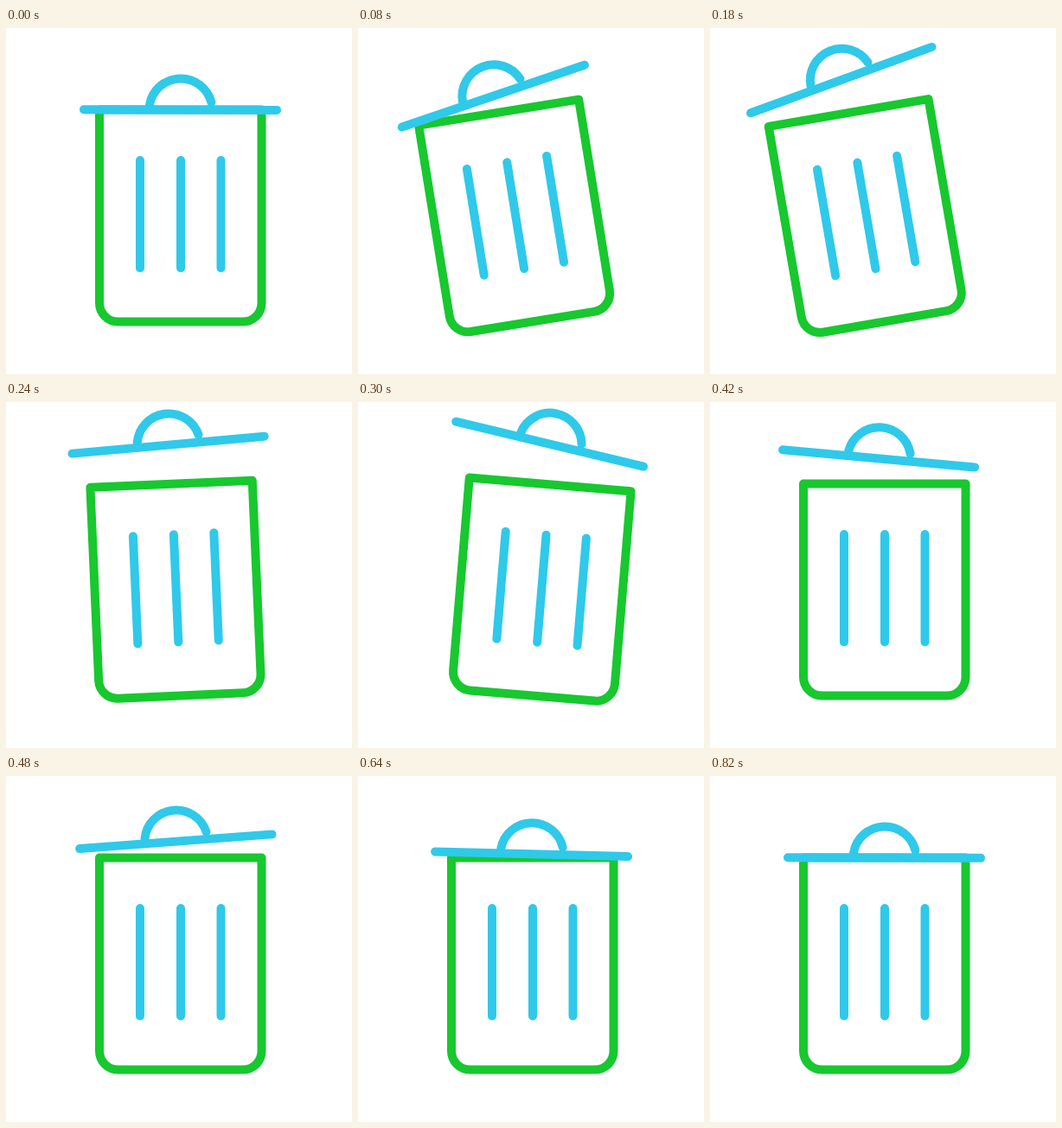
Recreate the animation shown at these times as an HTML page. Size 400x400 px, loop 0.84 s.

```html
<!DOCTYPE html>
<html lang="en">
<head>
<meta charset="utf-8">
<title>Trash can</title>
<style>
  html, body { margin: 0; width: 100%; height: 100%; overflow: hidden; background: #fff; }
  svg { display: block; width: 100vw; height: 100vh; }
  path { fill: none; stroke-width: 10; stroke-linecap: round; stroke-linejoin: round; }
  .green { stroke: #17c82e; }
  .blue { stroke: #2fc9ea; }
</style>
</head>
<body>
<svg viewBox="0 0 400 400">
  <g id="can">
    <path class="green" d="M108 94.5H295.5V318A21.5 21.5 0 0 1 274 339.5H129.5A21.5 21.5 0 0 1 108 318Z"/>
    <path class="blue" d="M155 153V277.5M202 153V277.5M248.5 153V277.5"/>
    <g id="lid">
      <path class="blue" d="M166 89A36.5 36.5 0 0 1 237.4 86"/>
      <path class="blue" d="M90 94.3L313 94.9"/>
    </g>
  </g>
</svg>
<script>
const LOOP = 840, STEP = 20;
const TILT = 97, SWING = 170, TOP = 290;  // tilted back, swing begins, lid highest
const can = document.getElementById('can');
const lid = document.getElementById('lid');

const smooth = s => s * s * (3 - 2 * s);

// The cubic-bezier(.25, .1, .25, 1) curve, solved by bisection.
function ease(x) {
  let lo = 0, hi = 1, u = 0.5;
  for (let i = 0; i < 24; i++) {
    u = (lo + hi) / 2;
    if (0.75 * u * (1 - u) + u ** 3 < x) lo = u; else hi = u;
  }
  return 0.3 * u * (1 - u) ** 2 + 3 * u * u * (1 - u) + u ** 3;
}

// Starts at 0 and eases in and out between [time, value] poses.
function sway(t, ...poses) {
  let from = 0, begin = 0;
  for (const [end, to] of poses) {
    if (t < end) return from + (to - from) * smooth((t - begin) / (end - begin));
    begin = end;
    from = to;
  }
  return from;
}

// The lid pops up quickly, then settles slowly.
function lidRise(t) {
  return 47 * (t < TOP ? Math.sin(Math.PI / 2 * t / TOP) : 1 - ease((t - TOP) / (LOOP - TOP)));
}

function draw(t) {
  const canTilt = sway(t, [TILT, -10], [SWING, -10], [310, 5], [410, 0]);
  const lidTilt = sway(t, [TILT, -10.6], [SWING, -10.6], [355, 13.7], [490, -4.7], [640, 1.3], [820, 0]);
  const shift = sway(t, [TILT, -3.2], [220, -1], [370, -6.8], [720, 0]);
  can.setAttribute('transform', `rotate(${canTilt} 201.5 339.5)`);
  lid.setAttribute('transform', `translate(${shift} ${-lidRise(t)}) rotate(${lidTilt} 201.5 94.6)`);
}

const start = performance.now();
function tick() {
  const t = (performance.now() - start) % LOOP;
  draw(Math.floor(t / STEP) * STEP);
  requestAnimationFrame(tick);
}
draw(0);
requestAnimationFrame(tick);
</script>
</body>
</html>
```
